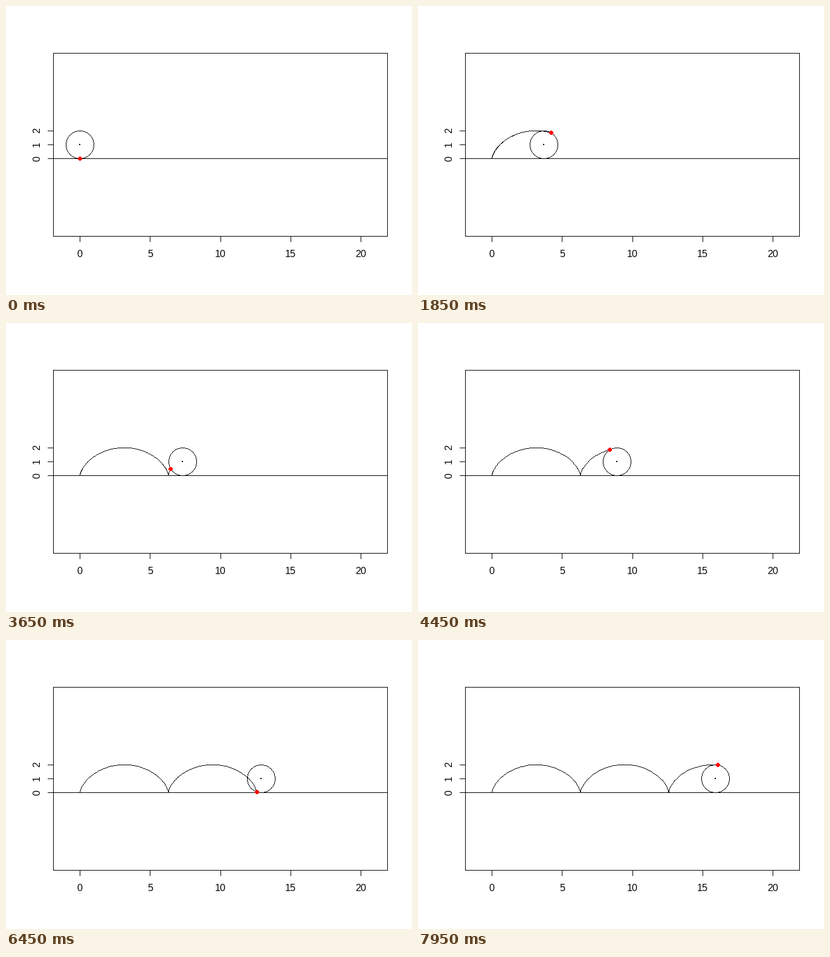
Recreate the animation shown at these times as a matplotlib script. Size 672 px wide and 480 px high, loop 8 s.

```python
import numpy as np
import matplotlib.pyplot as plt
from matplotlib.animation import FuncAnimation
from matplotlib.patches import Rectangle

plt.rcParams["font.family"] = "Liberation Sans"
plt.rcParams["text.hinting"] = "native"
plt.rcParams["text.hinting_factor"] = 1

W, H, DPI = 672, 480, 96
FRAMES, INTERVAL, STEP = 160, 50, 0.1
SAMPLES = 200
BLACK, RED = (0, 0, 0, 255), (255, 0, 0, 255)

# Plot region in pixels and the scale shared by both axes
LEFT, RIGHT, TOP, BOTTOM = 78.72, 631.68, 78.72, 382.08
SCALE = (RIGHT - LEFT) / 23.76
X0 = LEFT + 1.88 * SCALE
Y0 = (TOP + BOTTOM) / 2 + SCALE


def px(x):
    return X0 + SCALE * x


def py(y):
    return Y0 - SCALE * y


def cell(v):
    return np.floor(v).astype(int)


def cycloid(t):
    return t - np.sin(t), 1 - np.cos(t)


def ring(r):
    """Pixel offsets of a thin circle, mirrored from one octant."""
    a = np.arange(int(r / np.sqrt(2)) + 1)
    b = np.rint(np.sqrt(r * r - a * a)).astype(int)
    u, v = np.r_[a, b], np.r_[b, a]
    return np.r_[u, u, -u, -u], np.r_[v, -v, v, -v]


def disc(r):
    """Pixel offsets of a filled circle."""
    dy, dx = np.mgrid[-r:r + 1, -r:r + 1]
    inside = dx ** 2 + dy ** 2 <= r * (r + 0.5)
    return dx[inside], dy[inside]


def polyline(xs, ys):
    """Pixels of a thin line through whole-pixel points."""
    dx, dy = np.diff(xs), np.diff(ys)
    steps = np.maximum(abs(dx), abs(dy))
    seg = np.repeat(np.arange(len(steps)), steps)
    part = np.arange(len(seg)) - np.repeat(np.cumsum(steps) - steps, steps)
    f = part / steps[seg]
    return (cell(xs[seg] + f * dx[seg] + 0.5),
            cell(ys[seg] + f * dy[seg] + 0.5))


fig = plt.figure(figsize=(W / DPI, H / DPI), dpi=DPI, facecolor="white")
ax = fig.add_axes([0, 0, 1, 1])
layer = ax.imshow(np.zeros((H, W, 4), np.uint8), extent=(0, W, H, 0),
                  aspect="auto", interpolation="nearest", zorder=5)
ax.set_xlim(0, W)
ax.set_ylim(H, 0)
ax.axis("off")


def bar(x, y, w, h):
    ax.add_patch(Rectangle((x, y), w, h, fc="black", lw=0, antialiased=False))


def label(x, y, text, angle=0):
    ax.text(x, y, text, fontsize=12, rotation=angle, ha="left",
            va="baseline", rotation_mode="anchor")


# Frame, ground line and axes
l, r, t, b = (int(v) for v in (LEFT, RIGHT, TOP, BOTTOM))
for y in (t, int(Y0), b):
    bar(l, y, r - l + 1, 1)
for x in (l, r):
    bar(x, t, 1, b - t + 1)
for v in range(0, 21, 5):
    bar(int(px(v)), b, 1, 10)
    label(int(px(v) - 4.5 * len(str(v))), 417, str(v))
for v in range(3):
    bar(l - 9, int(py(v)), 10, 1)
    label(56, int(py(v) + 4.5), str(v), 90)

WHEEL, DOT = ring(23), disc(3)


def update(k):
    angle = k * STEP
    x, y = cycloid(np.linspace(0, angle, SAMPLES))
    xs, ys = cell(px(x)), cell(py(y))
    cx, cy = px(angle), py(1)
    hx, hy = int(cx - 0.96), int(cy - 0.96)

    img = np.zeros((H, W, 4), np.uint8)
    img[int(cy) + WHEEL[1], int(cx) + WHEEL[0]] = BLACK
    img[hy:hy + 2, hx:hx + 2] = BLACK
    tx, ty = polyline(xs, ys)
    img[ty, tx] = BLACK
    img[ys[-1] + DOT[1], xs[-1] + DOT[0]] = RED
    layer.set_data(img)
    return layer,


anim = FuncAnimation(fig, update, frames=FRAMES, interval=INTERVAL,
                     repeat=True, repeat_delay=0, blit=False)
plt.show()
```
